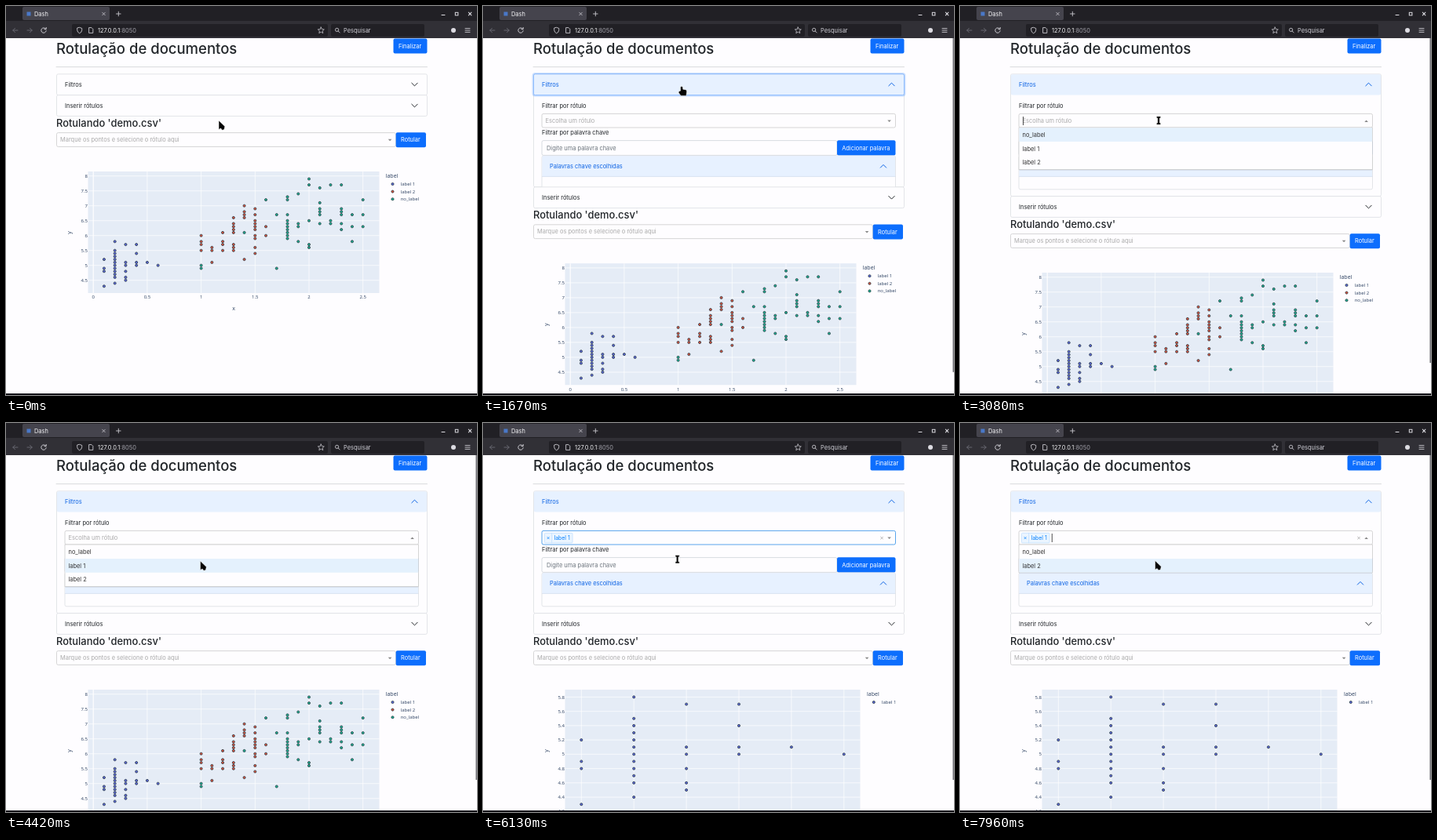
Animation of 600x496 px, one loop 8 s. Source, as an HTML page:

```html
<!DOCTYPE html>
<html lang="pt">
<head>
<meta charset="utf-8">
<title>Rotulação de documentos</title>
<style>
html, body { margin: 0; width: 100%; height: 100%; overflow: hidden; background: #fefdff; }
svg { display: block; width: 600px; height: 496px; }
text { font-family: Inter, "Noto Sans", sans-serif; font-size: 7.45px; fill: #212529; white-space: pre; }
.plot text { font-family: "Open Sans", "Noto Sans", sans-serif; font-size: 6px; fill: #2a3f5f; }
.plot .title { font-size: 7px; }
.line { fill: none; stroke-linecap: round; stroke-linejoin: round; }
</style>
</head>
<body>
<svg id="stage" viewBox="0 0 600 496" xmlns="http://www.w3.org/2000/svg"></svg>
<script>
const LOOP = 8000;
const PAGE_TOP = 41, PAGE_HEIGHT = 453, BODY_TOP = 114, BODY_HEIGHT = 129;
const OVERFLOW = 90; // body height at which the page starts to scroll
const BLUE = '#0d6efd', PALE = '#e7f1ff', LINK = '#0c63e4', PAPER = '#fefdff';

// Moments of the interaction, in ms
const FOCUS = 1390, EXPAND = 1434, TINT = 1460, OPEN_1 = 3000, PRESS = 4330,
      PICK = 4500, REPLOT = 4830, OPEN_2 = 6850;

// Pointer moves: start, end, from, to
const MOVES = [
  [40, 830, [271, 146], [253, 103]],
  [2210, 2790, [253, 103], [253, 146]],
  [3500, 4250, [253, 146], [247.5, 176]],
  [6000, 6790, [247.5, 176], [249, 146]],
  [7250, 7960, [249, 146], [248.5, 175.5]]
];

// x value: y values in tenths
const SERIES = [
  { name: 'label 1', color: '#5c66e0', points: {
    0.1: '43 48 49 52', 0.2: '44 46 47 48 49 50 51 52 53 54 55 58',
    0.3: '45 46 48 50 51 57', 0.4: '50 51 54 57', 0.5: '51', 0.6: '50' } },
  { name: 'label 2', color: '#e0513b', points: {
    1.0: '55 57 58 60', 1.1: '51 55 56', 1.2: '55 57 58 61',
    1.3: '55 56 57 61 62 63 64 66', 1.4: '52 66 67 68 70',
    1.5: '54 56 59 60 62 63 64 65 67 69', 1.6: '60 63' } },
  { name: 'no_label', color: '#18b592', points: {
    1.0: '49 50', 1.4: '61', 1.6: '72', 1.7: '49 67',
    1.8: '59 60 61 62 63 64 65 67 72 73', 1.9: '58 63 64 74',
    2.0: '56 57 65 77 79', 2.1: '64 67 68 69 71 76', 2.2: '64 65 77',
    2.3: '62 64 67 68 69 77', 2.4: '58 63 67', 2.5: '63 67 72' } }
];

const clamp = v => Math.max(0, Math.min(1, v));
const smooth = p => p * p * (3 - 2 * p);
const mix = (a, b, k) => `rgb(${a.map((v, i) => Math.round(v + (b[i] - v) * k))})`;

// CSS "ease": cubic-bezier(.25, .1, .25, 1)
function ease(p) {
  const curve = (u, a, b) => 3 * u * (1 - u) ** 2 * a + 3 * u * u * (1 - u) * b + u ** 3;
  let lo = 0, hi = 1;
  for (let i = 0; i < 20; i++) {
    const mid = (lo + hi) / 2;
    if (curve(mid, .25, .25) < p) lo = mid; else hi = mid;
  }
  return curve(lo, .1, 1);
}

const rect = (x, y, w, h, fill, extra = '') =>
  `<rect x="${x}" y="${y}" width="${w}" height="${h}" fill="${fill}" ${extra}/>`;
const text = (x, y, str, extra = '') => `<text x="${x}" y="${y}" ${extra}>${str}</text>`;
const line = (d, color, width = 1, extra = '') =>
  `<path class="line" d="${d}" stroke="${color}" stroke-width="${width}" ${extra}/>`;
const box = (x, y, w, h, stroke, extra = '') =>
  rect(x, y, w, h, PAPER, `stroke="${stroke}" stroke-width=".8" rx="2" ${extra}`);
const button = (x, y, w, h, label, tx) =>
  rect(x, y, w, h, BLUE, 'rx="2"') + text(tx, y + h / 2 + 2.7, label, 'style="fill:#fff"');
const chevron = (x, y, color, extra = '') =>
  line(`M${x - 3.7} ${y - 1.8}l3.7 3.7l3.7 -3.7`, color, 1, extra);
const fill = color => `style="fill:${color}"`;

function browser() {
  const ink = '#dddce2', dim = '#6d6c75', dark = '#212025';
  return rect(0, 0, 600, 20, dark) + rect(0, 19, 600, 22, '#313036') +
    rect(21, 1, 111, 17, '#45444d', 'rx="2"') + rect(26.5, 7.5, 5, 5, '#4a78c8') +
    text(36, 12.6, 'Dash', fill('#f4f4f6')) +
    line('M122.7 8.2l3.6 3.6m0 -3.6l-3.6 3.6', ink, .7) +
    line('M140.5 10h5.6m-2.8 -2.8v5.6', ink, .8) +
    line('M555 11.5h4', ink, 1) + rect(572.3, 8.3, 3.6, 3.6, 'none', `stroke="${ink}"`) +
    line('M589.3 8.2l3.6 3.6m0 -3.6l-3.6 3.6', ink, 1.1) +
    line('M15 31h-6.2m2.7 -2.7l-2.7 2.7l2.7 2.7', dim, .9) +
    line('M27 31h6.2m-2.7 -2.7l2.7 2.7l-2.7 2.7', dim, .9) +
    line('M50.5 29a3.2 3.2 0 1 0 .7 2.6M51.2 27.4v2.2h-2.2', ink, .9) +
    rect(84, 23, 326, 16, dark, 'rx="2"') + rect(414, 23, 119, 16, dark, 'rx="2"') +
    line('M93.7 27.4l3 1v2.4q-.2 2.8 -3 4q-2.8 -1.2 -3 -4v-2.4z', ink, .8) +
    line('M106 27.6h3l1.8 1.8v5h-4.8z', ink, .8) +
    text(117, 33.6, `127.0.0.1<tspan ${fill('#a3a2ab')}>:8050</tspan>`, fill('#f4f4f6')) +
    line('M401.3 27l1.2 2.6l2.8 .3l-2.1 1.9l.6 2.8l-2.5 -1.4l-2.5 1.4l.6 -2.8l-2.1 -1.9l2.8 -.3z', ink, .7) +
    `<circle cx="421.6" cy="30.4" r="2.1" fill="none" stroke="${ink}" stroke-width=".8"/>` +
    line('M423.2 32l2 2', ink, .8) + text(430, 33.6, 'Pesquisar', fill('#cfced6')) +
    `<circle cx="570" cy="31" r="3" fill="${ink}"/>` +
    line('M585 28.6h6m-6 2.4h6m-6 2.4h6', ink, .8);
}

function plot(id, right, xAxis, yAxis, series, legendX) {
  const left = 104.5, top = 211, bottom = 366;
  const px = v => xAxis.at + (v - xAxis.from) * xAxis.scale;
  const py = v => yAxis.at + (yAxis.from - v) * yAxis.scale;
  const label = v => String(+v.toFixed(1));
  let out = rect(left, top, right - left, bottom - top, '#e5ecf6');
  for (let i = 0; i < xAxis.count; i++) {
    const v = xAxis.from + i * xAxis.step, x = px(v);
    out += line(`M${x} ${top}V${bottom}`, '#fff', v ? .7 : 1.1, 'style="stroke-linecap:butt"') +
      text(x, 373.4, label(v), 'text-anchor="middle"');
  }
  for (let i = 0; i < yAxis.count; i++) {
    const v = yAxis.from - i * yAxis.step, y = py(v);
    out += line(`M${left} ${y}H${right}`, '#fff', .7, 'style="stroke-linecap:butt"') +
      text(104, y + 2.1, label(v), 'text-anchor="end"');
  }
  const dot = (x, y, color) =>
    `<circle cx="${x}" cy="${y}" r="1.55" fill="${color}" stroke="#2f4048" stroke-width=".85"/>`;
  for (const { color, points } of series)
    for (const x in points)
      for (const y of points[x].split(' ')) out += dot(px(+x), py(y / 10), color);
  out += text(legendX, 219.2, 'label', 'class="title"');
  series.forEach(({ name, color }, i) => {
    const y = 227 + i * 9.6;
    out += dot(legendX + 8.8, y, color) + text(legendX + 19, y + 2, name);
  });
  out += text((left + right) / 2, 388, 'x', 'class="title" text-anchor="middle"') +
    text(0, 0, 'y', 'class="title" text-anchor="middle" transform="translate(83 289) rotate(-90)"');
  return `<g class="plot" id="${id}">${out}</g>`;
}

function filterBody() {
  return text(75, 130, 'Filtrar por rótulo') +
    box(75, 137.4, 450.5, 17.6, '#ccc', 'id="select"') +
    text(79.5, 148.8, 'Escolha um rótulo', 'id="hint" style="fill:#aaa"') +
    `<path id="arrow" fill="#888"/>` +
    `<g id="chip">${rect(78.5, 140.3, 35.5, 12.6, '#ebf5ff', 'rx="1" stroke="#c2e0ff" stroke-width=".8"')}` +
    line('M87.6 140.3v12.6', '#c2e0ff', .8) +
    line('M81.9 145.4l2.4 2.4m0 -2.4l-2.4 2.4', '#007eff', .7) +
    text(90.5, 149.2, 'label 1', 'style="fill:#007eff;font-size:6.9px"') +
    line('M506.6 145.2l2.8 2.8m0 -2.8l-2.8 2.8', '#999', .7) + '</g>' +
    rect(0, 141, .8, 11, '#222', 'id="caret"') +
    text(75, 164.4, 'Filtrar por palavra chave') +
    box(75, 171.6, 376, 18.8, '#ced4da') +
    text(81, 183.7, 'Digite uma palavra chave', fill('#6c757d')) +
    button(451, 171.3, 74.5, 19.3, 'Adicionar palavra', 457.2) +
    box(75, 191, 450.5, 42.8, '#dcdfe3') +
    rect(75.4, 191.2, 449.7, 26.2, PALE, 'rx="1.5"') + line('M75.4 217.4h449.7', '#d0dcec', .7) +
    text(85, 207, 'Palavras chave escolhidas', fill(LINK)) +
    chevron(510, 204.3, LINK, 'transform="rotate(180 510 204.3)"');
}

const pointerShape = d =>
  `<path d="${d}" fill="#050505" stroke="#fff" stroke-width=".5" stroke-linejoin="round"/>`;
const POINTERS = {
  arrow: pointerShape('M0 0L0 11.4L2.6 9.9L4.4 12.3L6.9 11.6L7.8 7.6Z'),
  hand: pointerShape('M-1.5 .2Q0 -1.4 1.4 .2L1.8 3.2L5.2 3.7Q6.7 4.3 6.6 6.2L5.9 11.4H-1L-3.8 7.4Q-4.2 5 -1.5 5.2Z'),
  beam: pointerShape('M-2.6 -5.2H2.6V-3H1.3V3H2.6V5.2H-2.6V3H-1.3V-3H-2.6Z')
};

const stage = document.getElementById('stage');
stage.innerHTML =
  `<defs><clipPath id="page"><rect x="0" y="${PAGE_TOP}" width="600" height="${PAGE_HEIGHT}"/></clipPath>` +
  `<clipPath id="reveal"><rect id="window" x="60" y="${BODY_TOP}" width="480"/></clipPath></defs>` +
  rect(0, 0, 600, 496, PAPER) +
  '<g clip-path="url(#page)">' +
  text(64, 60.7, 'Rotulação de documentos', 'style="font-size:18.5px;font-weight:500"') +
  button(493.5, 41.5, 43, 19, 'Finalizar', 499.9) +
  line('M64 77.7h472.5', '#cfd0d2', .8) +
  box(64.5, 86.8, 472, 0, '#dcdfe3', 'id="panel"') +
  rect(64.9, 87.2, 471.2, 26.4, PALE, 'id="head" rx="2"') +
  rect(63.6, 85.9, 473.8, 28.6, 'none', `id="glow" rx="3" stroke="${BLUE}" stroke-opacity=".22" stroke-width="2"`) +
  rect(64.5, 86.8, 472, 26.8, 'none', 'id="ring" rx="2" stroke="#86b7fe" stroke-width=".9"') +
  text(75, 102.7, 'Filtros', 'id="headText"') + chevron(520.5, 100, '#212529', 'id="headChevron"') +
  `<g clip-path="url(#reveal)">${filterBody()}</g>` +
  '<g id="below">' +
  box(64.5, 113.6, 472, 26.8, '#dcdfe3') + text(75, 129.8, 'Inserir rótulos') + chevron(520.5, 127, '#212529') +
  text(64, 154, "Rotulando 'demo.csv'", 'style="font-size:12.9px;font-weight:500"') +
  box(64.5, 161.6, 432, 17.8, '#ccc') +
  text(69, 173, 'Marque os pontos e selecione o rótulo aqui', fill('#aaa')) +
  '<path d="M486.8 169.8h4.6l-2.3 2.5z" fill="#888"/>' +
  button(496.7, 161.2, 38.3, 19, 'Rotular', 503) +
  plot('allPlot', 475.5, { from: 0, at: 111.2, scale: 137.4, step: .5, count: 6 },
    { from: 8, at: 216.7, scale: 38, step: .5, count: 8 }, SERIES, 483.7) +
  plot('onePlot', 480.5, { from: .1, at: 125.3, scale: 669, step: .1, count: 6 },
    { from: 5.8, at: 220.4, scale: 91.2, step: .2, count: 9 }, SERIES.slice(0, 1), 489) +
  '</g><g id="menu"></g>' +
  rect(598.4, PAGE_TOP, 1.6, 0, '#77777c', 'id="scroll"') + '</g>' +
  rect(0, 494, 600, 2, '#17161b') + browser() +
  '<g id="pointer"></g>';

const el = {};
for (const node of stage.querySelectorAll('[id]')) el[node.id] = node;
const show = (node, on) => node.setAttribute('display', on ? 'inline' : 'none');
const set = (node, attrs) => { for (const k in attrs) node.setAttribute(k, attrs[k]); };

function pointerAt(t) {
  let pos = MOVES[0][2];
  for (const [start, end, from, to] of MOVES) {
    if (t < start) break;
    const p = smooth(clamp((t - start) / (end - start)));
    pos = from.map((v, i) => v + (to[i] - v) * p);
  }
  return pos;
}

function pointerKind(y, expanded, open) {
  if (y < (expanded ? BODY_TOP : 140.5)) return 'hand';
  if (!expanded || (open && y > 155)) return 'arrow';
  const onField = (y > 137 && y < 155) || (y > 171 && y < 191);
  return onField ? 'beam' : 'arrow';
}

function menuMarkup(items, y) {
  const row = 17.8, active = y > 173 ? 1 : 0;
  return rect(75, 156, 450.5, row * items.length + .4, '#000', 'opacity=".09" rx="1"') +
    rect(75, 155, 450.5, row * items.length, PAPER, 'stroke="#ccc" stroke-width=".8"') +
    items.map((item, i) =>
      (i === active ? rect(75.4, 155.3 + i * row, 449.7, row - .2, '#e4f1fd') : '') +
      text(79.5, 167.2 + i * 17.6, item, fill('#333'))).join('');
}

function draw(t) {
  const h = BODY_HEIGHT * ease(clamp((t - EXPAND) / 372));
  const tint = clamp((t - TINT) / 150);
  const picked = t >= PICK;
  const open = (t >= OPEN_1 && t < PICK) || t >= OPEN_2;
  const [x, y] = pointerAt(t);

  set(el.panel, { height: 26.8 + h });
  set(el.window, { height: h });
  set(el.below, { transform: `translate(0 ${h})` });
  set(el.head, { opacity: tint });
  const headColor = mix([33, 37, 41], [12, 99, 228], tint);
  el.headText.style.fill = headColor;
  set(el.headChevron, { stroke: headColor, transform: `rotate(${-180 * tint} 520.5 100)` });
  const ring = t < OPEN_1 ? clamp((t - FOCUS) / 120) : 0;
  set(el.ring, { opacity: ring });
  set(el.glow, { opacity: ring });

  set(el.select, { stroke: picked && !open ? '#2f8fe8' : '#ccc' });
  show(el.hint, !picked);
  show(el.chip, picked);
  set(el.arrow, { d: open ? 'M515.3 148h4.6l-2.3 -2.5z' : 'M515.3 145.6h4.6l-2.3 2.5z' });
  const typed = t >= OPEN_2 ? OPEN_2 : picked ? PICK : OPEN_1;
  const blink = Math.floor((t - typed) / 500) % 2 === 0;
  show(el.caret, t >= OPEN_1 && blink && !(t >= PRESS && t < PICK));
  set(el.caret, { x: picked ? 116.8 : 80 });

  show(el.allPlot, t < REPLOT);
  show(el.onePlot, t >= REPLOT);
  show(el.scroll, h > OVERFLOW);
  set(el.scroll, { height: PAGE_HEIGHT - Math.max(0, h - OVERFLOW) });
  el.menu.innerHTML = open
    ? menuMarkup(picked ? ['no_label', 'label 2'] : ['no_label', 'label 1', 'label 2'], y) : '';

  el.pointer.innerHTML = POINTERS[pointerKind(y, h > 60, open)];
  set(el.pointer, { transform: `translate(${x} ${y})` });
}

function tick() {
  draw(performance.now() % LOOP);
  requestAnimationFrame(tick);
}
tick();
</script>
</body>
</html>
```
